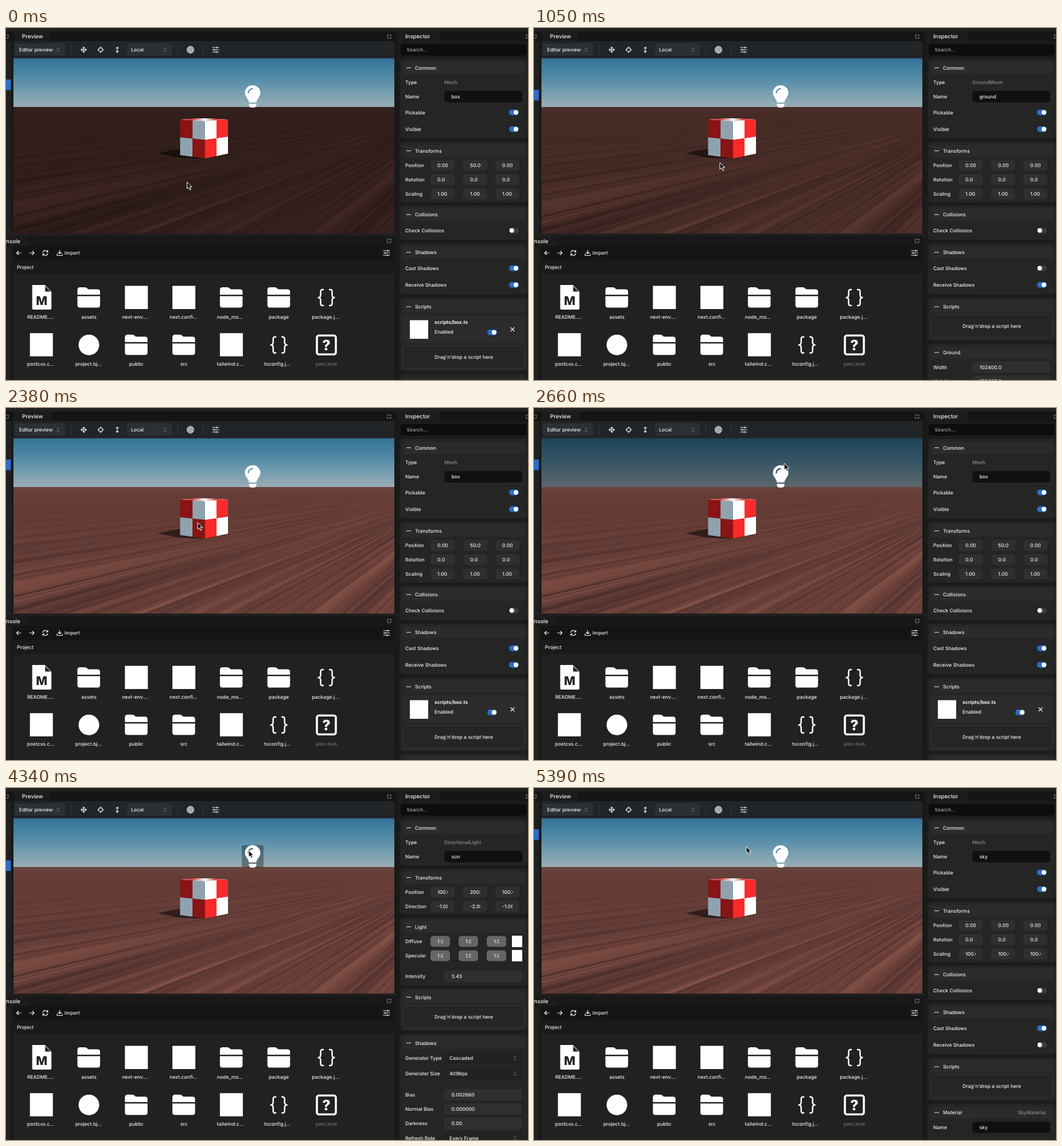
Recreate the animation shown at these times as an HTML page with a canvas. Size 910 px wide and 615 px high, loop 5.6 s.

```html
<!DOCTYPE html>
<html lang="en">
<head>
<meta charset="utf-8">
<title>Scene editor</title>
<style>
html, body { margin: 0; width: 910px; height: 615px; overflow: hidden; background: #191919; }
canvas { position: absolute; left: 13px; top: 53px; }
svg#ui { position: absolute; left: 0; top: 0; }
text { font: 500 8.55px Inter, "Open Sans", sans-serif; fill: #f2f2f2; text-rendering: geometricPrecision; white-space: pre; }
.line { fill: none; stroke: #f2f2f2; stroke-width: 1.2; stroke-linecap: round; stroke-linejoin: round; }
</style>
</head>
<body>
<canvas id="view" width="664" height="306"></canvas>
<svg id="ui" width="910" height="615" viewBox="0 0 910 615"></svg>
<script>
const start = performance.now();
const LOOP = 5600, STEP = 70, HORIZON = 138;

// ---------- scenery ----------
const hash = (i, j) => { const s = Math.sin(i * 127.1 + j * 311.7) * 43758.5453; return s - Math.floor(s); };
const mix = (a, b, k) => a + (b - a) * k;
const ease = k => k * k * (3 - 2 * k);
function noise(x, y) {
  const i = Math.floor(x), j = Math.floor(y), u = ease(x - i), v = ease(y - j);
  return mix(mix(hash(i, j), hash(i + 1, j), u), mix(hash(i, j + 1), hash(i + 1, j + 1), u), v);
}

function paintScenery() {
  const g = document.getElementById('view').getContext('2d');
  const sky = g.createLinearGradient(0, 0, 0, 85);
  [[0, '#347296'], [.35, '#4d87a5'], [.7, '#759eb0'], [1, '#99adb4']].forEach(([k, c]) => sky.addColorStop(k, c));
  g.fillStyle = sky;
  g.fillRect(0, 0, 664, 85);

  // Wood grain runs along lines that meet at a point on the horizon.
  const top = HORIZON - 53, h = 306 - top, img = g.createImageData(664, h);
  const octaves = [[1.3, .04, .18], [6, .1, .5], [16, .16, .55], [40, .25, .5], [80, .4, .3]];
  for (let r = 0; r < h; r++) {
    const d = r + .8;
    for (let c = 0; c < 664; c++) {
      const x = c + 13, a = (820 - x) / d, b = (x + 20) / d;
      const s = a + .22 * noise(a * 1.2, b * .4);
      let v = .5;
      for (const [f, along, amp] of octaves) {
        const fade = Math.exp(-1.5 * (f * a / d) ** 2);
        if (fade > .02) v += amp * fade * (noise(s * f, b * along + f) - .5);
      }
      v = Math.max(0, Math.min(1, v));
      const haze = Math.exp(-r / 9) * 8, p = (r * 664 + c) * 4;
      img.data[p] = mix(66, 132, v) + haze;
      img.data[p + 1] = mix(39, 81, v) + haze;
      img.data[p + 2] = mix(36, 71, v) + haze;
      img.data[p + 3] = 255;
    }
  }
  g.putImageData(img, 0, top);

  g.translate(-13, -53);
  g.fillStyle = 'rgba(22,15,16,.66)';
  g.beginPath();
  [[304, 211], [285, 214], [264, 219], [298, 226], [326, 228], [347, 228], [347, 215]].forEach(p => g.lineTo(...p));
  g.fill();
}

// ---------- drawing helpers ----------
const rect = (x, y, w, h, fill, r = 0, extra = '') =>
  `<rect x="${x}" y="${y}" width="${w}" height="${h}" rx="${r}" fill="${fill}" ${extra}/>`;
const text = (x, y, s, style = '', anchor = 'start') =>
  `<text x="${x}" y="${y + 3.1}" text-anchor="${anchor}" style="${style}">${s}</text>`;
const line = (d, style = '') => `<path class="line" d="${d}" style="${style}"/>`;
const shape = (d, fill = '#fff') => `<path d="${d}" fill="${fill}"/>`;
const at = (x, y, s) => `<g transform="translate(${x} ${y})">${s}</g>`;
const GRAY = 'fill:#8d8d8d';

const chevrons = (x, y) => at(x, y, line('M-2 -1.4L0 -3.2L2 -1.4M-2 1.4L0 3.2L2 1.4', 'stroke:#999;stroke-width:.8'));
const corners = (x, y) => at(x, y, line('M-3 -1V-3H-1M1 -3H3V-1M3 1V3H1M-1 3H-3V1', 'stroke:#a8a8a8;stroke-width:.9'));
const sliders = (x, y) => at(x, y, line('M-5.5 -4H5.5M-5.5 0H5.5M-5.5 4H5.5M2 -5.2V-2.8M-2.5 -1.2V1.2M1 2.8V5.2'));
const toggle = (x, y, on) => rect(x - 8.5, y - 5, 17, 10, on ? '#2b6dc9' : '#3b3b3b', 5) +
  `<circle cx="${x + (on ? 3.4 : -3.8)}" cy="${y}" r="4" fill="#fff"/>`;

// ---------- window frame ----------
function chrome() {
  const sep = x => rect(x, 30, 1, 16, '#3a3d3f');
  return rect(0, 0, 910, 6, '#212121') + rect(0, 6, 682, 17, '#151515') +
    rect(0, 23, 9, 336, '#202020') + rect(14, 6, 64, 17, '#1c1c1c') + rect(13, 23, 664, 30, '#222527') +
    text(28, 15, 'Preview', 'font-size:9.6px') + corners(668, 15) + corners(1, 15) +
    rect(15, 27, 88, 21, '#2d3032', 4) + text(23, 38, 'Editor preview') + chevrons(91, 38) + sep(113) +
    at(135.5, 38, line('M-4.5 0H4.5M0 -4.5V4.5M-3 -1.5L-4.7 0L-3 1.5M3 -1.5L4.7 0L3 1.5M-1.5 -3L0 -4.7L1.5 -3M-1.5 3L0 4.7L1.5 3')) +
    at(165, 38, line('M-3.5 0A3.5 3.5 0 1 1 3.5 0A3.5 3.5 0 1 1 -3.5 0M-5.2 0H-2.5M2.5 0H5.2M0 -5.2V-2.5M0 2.5V5.2')) +
    at(194, 38, line('M0 -4.5V4.5M-2 -2.6L0 -4.6L2 -2.6M-2 2.6L0 4.6L2 2.6')) +
    rect(211, 27, 78, 21, '#2d3032', 4) + text(218, 38, 'Local') + chevrons(277, 38) + sep(299) +
    at(321.5, 38, '<circle r="6.5" fill="#8b8b8b"/>' +
      line('M-6 0H6M0 -6V6M-5 -3.2H5M-5 3.2H5M-2 -6Q-5 0 -2 6M2 -6Q5 0 2 6M-6 0A6 6 0 1 1 6 0A6 6 0 1 1 -6 0', 'stroke:#d8d8d8;stroke-width:.6')) +
    sep(343) + sliders(365.5, 38) +
    rect(0, 359, 682, 4, '#202020') + rect(0, 363, 677, 17, '#181818') + rect(0, 363, 38, 17, '#1c1c1c') +
    text(0, 372.5, 'nsole', 'font-size:9.6px') + corners(668, 372) +
    rect(0, 380, 9, 235, '#202020') + rect(13, 381, 664, 24, '#141414') + rect(13, 405, 664, 25, '#1a1a1a') +
    rect(13, 430, 664, 185, '#212121') +
    line('M26 393H18.5M21.5 390L18.5 393L21.5 396M41 393H49M46 390L49 393L46 396') +
    at(68.5, 393, line('M-4.3 -1A4.4 4.4 0 0 1 3.6 -2.6M4.4 -4.5V-1.9H1.8M4.3 1A4.4 4.4 0 0 1 -3.6 2.6M-4.4 4.5V1.9H-1.8')) +
    at(93.5, 393, line('M0 -4.5V1.5M-2.5 -1L0 1.5L2.5 -1M-4.5 1.5V4.5H4.5V1.5')) +
    text(102, 393, 'Import') + sliders(663.5, 393) + text(19, 418, 'Project') +
    rect(682, 6, 228, 17, '#151515') + rect(682, 6, 75, 17, '#1c1c1c') + rect(682, 23, 228, 592, '#1b1b1b') +
    text(696, 15, 'Inspector', 'font-size:9.6px') + corners(910, 15) +
    rect(688, 28, 220, 20, '#0d0d0d', 5) + text(698.5, 38, 'Search...', 'fill:#a3a3a3');
}

// ---------- asset browser ----------
const icons = {
  doc: () => shape('M-16 -22H6L17.5 -10V19Q17.5 21 15.5 21H-14Q-16 21 -16 19Z') + shape('M6.5 -20V-10.5H16Z', '#212121') +
    '<text y="13" x=".5" text-anchor="middle" style="font-size:21px;font-weight:800;fill:#212121">M</text>',
  folder: () => shape('M-20 -5V-13.5Q-20 -18 -15.5 -18H-7.5Q-5.5 -18 -4 -17L-1 -14.5H15Q19.5 -14.5 19.5 -10V-5Z') +
    shape('M-20 -2.5H19.5V13Q19.5 17.5 15 17.5H-15.5Q-20 17.5 -20 13Z'),
  square: () => rect(-20, -20.5, 40, 40.5, '#fff'),
  disc: () => '<circle r="18" fill="#fff"/>',
  braces: () => ['', 'scale(-1 1)'].map(m => `<g transform="${m}">` + line(
    'M-5.5 -14H-6.5Q-10 -14 -10 -10V-5Q-10 0 -14 0Q-10 0 -10 5V10Q-10 14 -6.5 14H-5.5', 'stroke-width:2.5;stroke:#fff') + '</g>').join(''),
  unknown: () => rect(-16.5, -16.5, 33, 33, 'none', 3.5, 'stroke="#fff" stroke-width="3.6"') +
    '<text y="9" text-anchor="middle" style="font-size:25px;font-weight:800;fill:#fff">?</text>'
};
const assets = [
  ['doc', 'README....', 60], ['folder', 'assets', 144.5], ['square', 'next-env....', 225.5], ['square', 'next.confi...', 309.5],
  ['folder', 'node_mo...', 390.5], ['folder', 'package', 475.5], ['braces', 'package.j...', 557],
  ['square', 'postcss.c...', 60.5], ['disc', 'project.bj...', 144], ['folder', 'public', 227], ['folder', 'src', 310],
  ['square', 'tailwind.c...', 391], ['braces', 'tsconfig.j...', 473], ['unknown', 'yarn.lock', 558.5]
];
const browser = () => assets.map(([icon, name, x], i) => {
  const row = Math.floor(i / 7), y = 471 + row * 82.7;
  return at(61.7 + (i % 7) * 82.8, y, icons[icon]()) +
    text(x, y + 33.6, name, icon === 'unknown' ? 'fill:#777' : '', 'middle');
}).join('');

// ---------- inspector ----------
const card = (y, h, title, note = '') => rect(687, y, 222, h, '#252525', 6) + rect(692, y + 5, 213, 21, '#2b2b2b', 5) +
  line(`M698.5 ${y + 15.5}H705.5`) + text(713, y + 15.5, title) + text(892, y + 15.5, note, GRAY, 'end');
const label = (y, s) => text(696, y, s);
const field = (y, name, value, fill = '#2f2f2f') => label(y, name) + rect(764, y - 10, 136, 20, fill, 5) + text(776.5, y, value);
const nameField = (y, value) => field(y, 'Name', value, '#101010');
const select = (y, name, value) => label(y, name) + rect(764, y - 10, 136, 20, '#222', 5) + text(773, y, value) + chevrons(887, y);
const flag = (y, name, on) => label(y, name) + toggle(885.5, y, on);
const cell = (x, y, w, value, fill) => rect(x, y - 9.5, w, 19, fill, 5) +
  `<svg x="${x + 12}" y="${y - 9}" width="${w - 24}" height="18" overflow="hidden">${text(0, 9, value)}</svg>`;
const vector = (y, name, values) => label(y, name) + values.map((v, i) => cell([740, 797, 853][i], y, 42, v, '#2f2f2f')).join('');
const color = (y, name) => label(y, name) + [740, 789, 838].map(x => cell(x, y, 34, '1.00', '#666')).join('') +
  rect(882, y - 10, 18, 20, '#fff', 1);
const dropZone = y => rect(691.5, y - 20, 213, 39.5, '#252525', 5, 'stroke="#3a3a3a"') +
  text(798, y, "Drag'n'drop a script here", '', 'middle');

const mesh = (type, name, y, scale, cast, receive) =>
  card(54, 139, 'Common') + label(95, 'Type') + text(764, 95, type, GRAY) + nameField(120, name) +
  flag(147.5, 'Pickable', true) + flag(176.8, 'Visible', true) +
  card(199, 106, 'Transforms') + vector(240, 'Position', ['0.00', y, '0.00']) +
  vector(265, 'Rotation', ['0.0', '0.0', '0.0']) + vector(290, 'Scaling', [scale, scale, scale]) +
  card(310.5, 60, 'Collisions') + flag(353.7, 'Check Collisions', false) +
  card(376.5, 89, 'Shadows') + flag(419.7, 'Cast Shadows', cast) + flag(448.8, 'Receive Shadows', receive);

const inspectors = {
  box: mesh('Mesh', 'box', '50.0', '1.00', true, true) +
    card(471.5, 128, 'Scripts') + rect(691, 502, 214, 48, '#2b2b2b', 6) + rect(704, 510.5, 32, 32.5, '#fff') +
    text(747, 514, 'scripts/box.ts', 'font-weight:700') + text(747, 531.3, 'Enabled') + toggle(847.5, 531.8, true) +
    line('M880 523.5L886 529.5M886 523.5L880 529.5') + dropZone(575) +
    rect(687, 604.5, 222, 20, '#252525', 6) + rect(692, 609.5, 213, 20, '#2b2b2b', 5),
  ground: mesh('GroundMesh', 'ground', '0.00', '1.00', false, true) +
    card(471.5, 75, 'Scripts') + dropZone(521.3) +
    card(551.5, 80, 'Ground') + field(592.7, 'Width', '102400.0') + field(617.3, 'Height', '102400.0'),
  sun: card(54, 81, 'Common') + label(95, 'Type') + text(764, 95, 'DirectionalLight', GRAY) + nameField(120, 'sun') +
    card(141, 80, 'Transforms') + vector(182, 'Position', ['100.00', '200.00', '100.00']) +
    vector(207, 'Direction', ['-1.00', '-2.00', '-1.00']) +
    card(227, 118, 'Light') + color(268, 'Diffuse') + color(293, 'Specular') + field(329, 'Intensity', '3.43') +
    card(350, 74, 'Scripts') + dropZone(400) +
    card(430, 200, 'Shadows') + select(472, 'Generator Type', 'Cascaded') + select(499, 'Generator Size', '4096px') +
    field(536, 'Bias', '0.002680') + field(561, 'Normal Bias', '0.000000') + field(586, 'Darkness', '0.00') +
    select(611.5, 'Refresh Rate', 'Every Frame'),
  sky: mesh('Mesh', 'sky', '0.00', '100.00', true, false) +
    card(471.5, 75, 'Scripts') + dropZone(521.3) +
    card(551.5, 80, 'Material', 'SkyMaterial') + nameField(592.7, 'sky')
};
const treeRow = { sky: 72, box: 90, ground: 108, sun: 126.5 };

// ---------- objects in the view ----------
function cube() {
  const side = (x0, x1, t0, t1, b0, b1, colors) => {
    const p = (u, v) => `${mix(x0, x1, u)} ${mix(mix(t0, t1, u), mix(b0, b1, u), v)}`;
    return [0, 1, 2, 3].map(n => {
      const u = (n & 1) / 2, v = (n >> 1) / 2;
      return shape(`M${p(u, v)}L${p(u + .5, v)}L${p(u + .5, v + .5)}L${p(u, v + .5)}Z`, colors[(n & 1) ^ (n >> 1)]);
    }).join('');
  };
  return shape('M303.5 160L345 157.8L387 160L347 163Z', '#fff') +
    shape('M303.5 160L324 159L347 160.3L325 161.6ZM387 160L366 159L347 160.3L367 161.6Z', '#f23a3a') +
    side(303.5, 347, 160, 163, 222, 228, ['#881414', '#8fa3af']) +
    side(347, 387, 163, 160, 228, 219.5, ['#ffffff', '#fb2a2a']);
}
const bulb = `<mask id="cut"><rect x="405" y="95" width="50" height="50" fill="#fff"/>
  <path d="M422.5 113A7.5 7.5 0 0 1 429.5 106" fill="none" stroke="#000" stroke-width="2.6" stroke-linecap="round"/></mask>
  <g mask="url(#cut)">` +
  shape('M430 100C438 100 443.5 106 443.5 113.3C443.5 117.5 441.5 120 439.5 123C437.5 126 437 127 436.5 130H423.5C423 127 422.5 126 420.5 123C418.5 120 416.5 117.5 416.5 113.3C416.5 106 422 100 430 100Z') +
  shape('M423.5 132.5H436.5V134Q436.5 139 431.5 139H428.5Q423.5 139 423.5 134Z') + '</g>';

const ui = document.getElementById('ui');
ui.innerHTML = chrome() + browser() +
  Object.keys(inspectors).map(k => `<g id="panel-${k}">${inspectors[k]}</g>`).join('') +
  rect(0, 0, 8.5, 18.5, '#2b6dc9', 0, 'id="mark"') +
  rect(13, HORIZON, 664, 221, '#000', 0, 'id="groundShade"') + rect(13, 53, 664, 85, '#000', 0, 'id="skyShade"') +
  cube() + '<path id="boxShade" d="M303.5 160L345 157.8L387 160V219.5L347 228L303.5 222Z"/>' +
  rect(411, 100, 38, 39, '#000', 3, 'id="bulbShade"') + bulb +
  '<g id="ring" fill="none" stroke="#d6d6d6"><circle r="17" stroke-width="1"/><circle r="14.3" stroke-width="1.2"/></g>' +
  '<path id="cursor" d="M0 0V11.8L2.8 9.3L4.9 14L7 13L5 8.5H8.6Z" fill="#111" stroke="#fff" stroke-width="1" stroke-linejoin="round"/>';
const el = id => document.getElementById(id);

// ---------- motion ----------
const clicks = [140, 1680, 3360, 5180];
const picks = [[0, 'box'], [210, 'ground'], [1820, 'box'], [3430, 'sun'], [5320, 'sky']];
const path = [[910, 315.5, 269], [980, 317, 262], [1050, 324, 235], [1120, 331, 209], [1190, 333, 202.5],
  [2380, 334, 200], [2450, 365, 155], [2520, 405, 118], [2590, 430, 99], [2660, 436, 96.5], [2800, 435, 98], [2940, 426, 109.5],
  [4340, 423, 109], [4410, 408, 107.5], [4550, 378, 104], [4690, 370, 102.5]];
const shades = {
  groundShade: [.5, [140, 1], [280, 0], [910, 0], [980, .6], [1050, .6], [1120, 0]],
  boxShade: [.45, [1050, 0], [1190, 1], [1750, 1], [1890, 0], [2380, 0], [2450, .6], [2520, 0]],
  skyShade: [.48, [2450, 0], [2590, .8], [2660, .85], [2800, 1], [2940, 1], [3150, 0], [4410, 0], [4550, 1], [5250, 1], [5390, 0]],
  bulbShade: [.33, [3010, 0], [3150, 1], [4340, 1], [4410, 0]]
};

function sample(keys, t, i = 1) {
  const n = keys.findIndex(k => k[0] > t);
  if (n === 0) return keys[0][i];
  if (n < 0) return keys[keys.length - 1][i];
  const [a, b] = [keys[n - 1], keys[n]];
  return mix(a[i], b[i], (t - a[0]) / (b[0] - a[0]));
}

function draw(time) {
  const t = Math.floor((time % LOOP) / STEP) * STEP;
  const picked = picks.filter(p => p[0] <= t).pop()[1];
  for (const k in inspectors) el('panel-' + k).style.display = k === picked ? '' : 'none';
  el('mark').setAttribute('y', treeRow[picked]);
  for (const id in shades) {
    const [alpha, ...keys] = shades[id];
    el(id).style.opacity = alpha * sample(keys, t);
  }
  const x = sample(path, t, 1), y = sample(path, t, 2);
  el('cursor').setAttribute('transform', `translate(${x} ${y})`);
  el('ring').setAttribute('transform', `translate(${x - .5} ${y + .5})`);
  el('ring').style.opacity = clicks.includes(t) ? 1 : clicks.includes(t - STEP) ? .5 : 0;
}

paintScenery();
function tick() {
  draw(performance.now() - start);
  requestAnimationFrame(tick);
}
tick();
</script>
</body>
</html>
```
